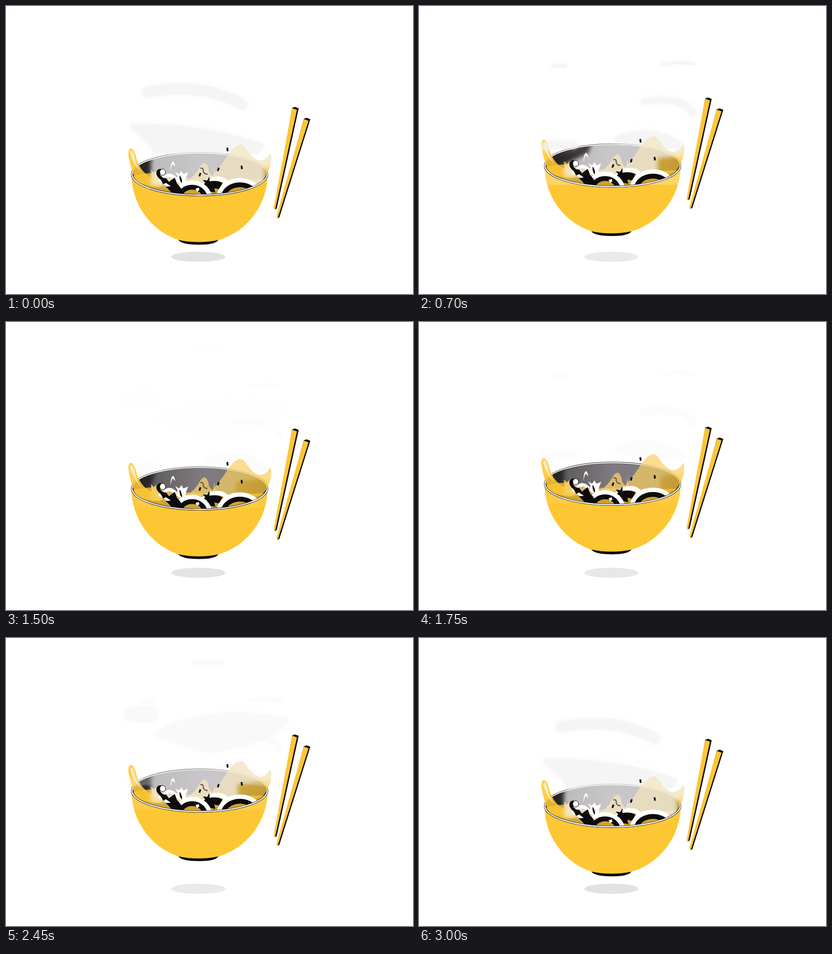
Animation, 842 px wide and 596 px high, one loop 3050 ms. Source, as an HTML page:

```html
<!DOCTYPE html>
<html lang="en">
<head>
<meta charset="utf-8">
<title>Noodle bowl</title>
<style>
  html, body { margin: 0; width: 100%; height: 100%; overflow: hidden; background: #fff; }
  svg { display: block; width: 100vw; height: 100vh; }
  .y { fill: #fdc633; }
  .k { fill: #0d0b0c; }
  .w { fill: #fff; }
  .line { fill: none; }
</style>
</head>
<body>
<svg viewBox="0 0 842 596">
  <defs>
    <linearGradient id="wall">
      <stop offset="0" stop-color="#1f1b1c"/>
      <stop offset=".2" stop-color="#343031"/>
      <stop offset=".5" stop-color="#58525a"/>
      <stop offset=".8" stop-color="#58525a"/>
      <stop offset="1" stop-color="#3a3637"/>
    </linearGradient>
    <filter id="soft" filterUnits="userSpaceOnUse" x="200" y="60" width="440" height="300"><feGaussianBlur stdDeviation="1.5"/></filter>
    <filter id="halo" filterUnits="userSpaceOnUse" x="200" y="60" width="440" height="300"><feGaussianBlur stdDeviation="9"/></filter>
    <filter id="edge" filterUnits="userSpaceOnUse" x="200" y="200" width="420" height="260"><feGaussianBlur stdDeviation="4"/></filter>
    <ellipse id="rim" cx="400.5" cy="348" rx="140" ry="43.5"/>
    <path id="peak" d="M428 350Q444 331 454 316Q472 287 485 287Q492 287 499 299Q513 319 525 320Q538 320 547 304Q551 314 547 329Q544 343 534 356Q515 376 428 365Z"/>
    <path id="body" d="M259.5 348A141 144 0 0 0 356 484Q398 493 441 484A141 144 0 0 0 541.5 348Z"/>
    <clipPath id="inside"><use href="#rim"/></clipPath>
    <clipPath id="open"><path d="M200 200H620V348H540.5A140 43.5 0 0 1 260.5 348H200Z"/></clipPath>
    <clipPath id="misty"><use href="#rim"/><use href="#peak"/></clipPath>
    <clipPath id="shell"><use href="#body"/></clipPath>
  </defs>

  <ellipse id="shadow" cx="398" cy="519" rx="56" ry="10.5"/>

  <g class="bob">
    <path class="k" d="M355 481Q358 494 400 494Q438 494 441 481Z"/>
    <use href="#body" class="y"/>
    <rect id="band" x="250" y="352" width="300" height="36" fill="#f7f3ea" clip-path="url(#shell)"/>
    <use href="#rim" fill="url(#wall)"/>
    <path fill="#d0a22b" d="M262 352Q300 340 330 352Q400 362 540 358V400H262Z" clip-path="url(#inside)"/>
    <g class="line">
      <use href="#rim" stroke="#2a2627" stroke-width="3.6"/>
      <use href="#rim" stroke="#fff" stroke-width="2"/>
    </g>
    <use href="#peak" class="y" opacity=".7" clip-path="url(#open)"/>
    <path class="y" opacity=".75" d="M376 361Q389 352 397 340Q405 325 411 325Q418 327 420 343Q424 351 431 353V363H376Z"/>
    <path class="y" opacity=".8" d="M431 334L433 353H429Z"/>
    <path class="y" opacity=".88" d="M253 307Q253 295 259 295Q266 297 270 316Q276 337 291 349L301 355L300 339L306 345L314 338L315 349L326 352L319 359L330 366L318 374Q290 374 270 363Q259 344 253 307Z"/>
    <path fill="#fdeab8" d="M257 305Q258 298 261 300Q266 306 268 322Q272 335 281 345Q263 329 257 305Z"/>
  </g>

  <g id="steam" fill="#f2f2f2">
    <g class="bob"><g clip-path="url(#misty)"><path id="mist" filter="url(#edge)"/></g></g>
  </g>

  <g class="bob">
    <g clip-path="url(#open)">
      <path class="line" stroke="#fff" stroke-width="9" d="M400 380Q420 353 445 358Q455 361 458 371"/>
      <path class="k" d="M406 372L412 366L407 360L416 361L421 353V363Q436 360 448 366L441 379L431 377L433 386L418 383L415 372Z"/>
      <g id="noodles"></g>
      <path class="line" stroke="#fff" stroke-width="7" d="M316 360Q336 366 347 389M327 355Q340 344 351 358"/>
      <path class="k" d="M311 349L316 347Q322 358 331 356L337 364L349 355L354 368Q363 376 367 389H344Q337 379 330 374L341 373L331 366L325 369L321 361Z"/>
      <path class="w" d="M350 343L358 348L363 341L367 348L377 344L371 359L375 365L363 370L352 362L355 352Z"/>
      <path class="k" d="M359 350Q365 357 364 367Q358 361 359 350Z"/>
      <path class="w" d="M392 378L399 376L400 381L395 384ZM421 352L427 356L423 359Z"/>
    </g>
    <path class="k" d="M311 344Q312 337 321 337L319 350L326 357L318 358Q311 352 311 344Z"/>
    <ellipse class="w" cx="324" cy="344" rx="6" ry="6.5" stroke="#0d0b0c"/>
    <path class="w" d="M340 341Q341 322 346 322Q349 324 350 333Q346 327 344 328Q342 333 340 341Z"/>
    <path class="line" stroke="#68635c" stroke-width="2.5" d="M402 336Q409 334 408 342Q410 348 417 348"/>
    <g id="bits" class="k"></g>
    <g class="line">
      <path stroke="#2a2627" stroke-width="4" d="M260.5 348A140 43.5 0 0 0 540.5 348"/>
      <path stroke="#fff" stroke-width="2.3" d="M260.5 348A140 43.5 0 0 0 540.5 348"/>
    </g>
  </g>

  <g id="sticks"></g>
</svg>
<script>
const LOOP = 3050, STEP = 50, CYCLE = LOOP / 3;
const $ = id => document.getElementById(id);
const clamp = v => Math.min(1, Math.max(0, v));
const ease = u => (1 - Math.cos(Math.PI * clamp(u))) / 2;
const shift = (el, y) => el.setAttribute('transform', `translate(0 ${y.toFixed(2)})`);

// turning points of each float: [time, height]
const bowlTurns = [[150, 0], [900, -21.5], [1400, -2.5], [2300, -35.5], [3075, 0]];
const stickTurns = [[0, 0], [625, -20], [1500, 11.5], [2400, -9.5], [3050, 0]];

function float(turns, t) {
  let y = turns[0][1];
  for (let i = 1; i < turns.length; i++) {
    const [t0, y0] = turns[i - 1], [t1, y1] = turns[i];
    y += (y1 - y0) * ease((t - t0) / (t1 - t0));
  }
  return y;
}

// steam poses: phase of full strength, then wisps as [path, thickness]
const poses = [
  { at: 0, wisps: [['M293 179Q400 156 488 203', 24], ['M263 250Q400 248 528 290L518 300H312Q300 278 263 250Z', 14]] },
  { at: 117, wisps: [['M262 134Q390 104 470 138Q502 162 430 163', 10], ['M254 222Q268 200 360 216Q545 215 541 246Q430 275 270 250Z', 20]] },
  { at: 183, wisps: [['M389 103H447', 11], ['M260 212H300', 32], ['M312 252Q420 195 578 225Q540 270 420 285Z', 14]] },
  { at: 707, wisps: [['M278 123H302', 9], ['M502 121Q535 113 568 119', 7], ['M465 197Q545 185 566 220', 15], ['M260 290Q290 284 320 287', 18], ['M412 276Q480 246 542 290Z', 16]] }
];

for (const p of poses) {
  const shapes = p.wisps.map(([d, w]) =>
    `<path d="${d}" stroke-width="${w}" fill="${d.endsWith('Z') ? '#f2f2f2' : 'none'}"/>`).join('');
  p.el = document.createElementNS('http://www.w3.org/2000/svg', 'g');
  p.el.innerHTML = `<g stroke="#f2f2f2" stroke-linecap="round" stroke-linejoin="round">
    <g filter="url(#halo)" opacity=".45">${shapes}</g><g filter="url(#soft)">${shapes}</g></g>`;
  $('steam').prepend(p.el);
}

const noodle = (x, y, rx, ry) => `<g stroke-width="10">
  <ellipse cx="${x}" cy="${y}" rx="${rx}" ry="${ry}" fill="#d0a22b" stroke="#fff"/>
  <ellipse cx="${x}" cy="${y}" rx="${rx - 9}" ry="${ry - 9}" fill="none" stroke="#0d0b0c"/></g>`;
$('noodles').innerHTML = noodle(385, 399, 36, 33) + noodle(484, 396, 43, 35);

$('bits').innerHTML = [[458, 297], [487.5, 334], [439, 338], [401, 349]].map(([x, y], i) =>
  `<path transform="translate(${x} ${y}) rotate(${i < 2 ? -8 : 18})" d="M-1.7-3.5L2-3.8L2 3.3L-1.5 3.8Z"/>`).join('');

// x, y: left corner of the cap; dx, dy: from there to the tip
const stick = (x, y, dx, dy) => `<g transform="translate(${x} ${y})">
  <path class="k" d="M0 0L6-2L13.5 1L${dx + 6.5} ${dy + 1}L${dx + 2} ${dy + 2.5}Z"/>
  <path class="y" d="M0 .5L10 3.5L${dx + 3.5} ${dy + 1.5}L${dx} ${dy}Z"/>
  <path class="k" d="M0 0L6-2L13.5 1L10 4Z"/></g>`;
$('sticks').innerHTML = stick(592, 211, -38.5, 207.5) + stick(616, 233.5, -57, 203);

const bobs = [...document.querySelectorAll('.bob')];
const ahead = (a, b) => ((b - a) % CYCLE + CYCLE) % CYCLE;

// strength of a pose, and the time from its full strength
function presence(i, phase) {
  const n = poses.length, at = poses[i].at;
  const since = ahead(at, phase), until = ahead(phase, at);
  const fade = 1 - since / ahead(at, poses[(i + 1) % n].at);
  const grow = 1 - until / ahead(poses[(i + n - 1) % n].at, at);
  return [ease(Math.max(fade, grow)), fade > 0 ? since : -until];
}

function draw(t) {
  const y = float(bowlTurns, t), phase = t % CYCLE, cycle = Math.floor(t / CYCLE);
  bobs.forEach(el => shift(el, y));
  shift($('sticks'), float(stickTurns, t));

  const g = Math.round(226 + 8 * clamp(-y / 18));
  $('shadow').setAttribute('fill', `rgb(${g},${g},${g})`);

  // the middle cycle is thin
  const density = .25 + .48 * clamp((Math.abs(t - LOOP / 2) - 430) / 150);
  $('steam').setAttribute('opacity', density);

  const rise = 14 * cycle * Math.sin(Math.PI * phase / CYCLE) ** 2;
  poses.forEach((p, i) => {
    const [w, d] = presence(i, phase);
    p.el.setAttribute('opacity', w);
    shift(p.el, -rise - .12 * d);
    if (i === 3) $('band').setAttribute('opacity', .4 * density * w);
  });

  // clear patches at both sides of the bowl
  const left = 320 + 85 * Math.exp(-(((t - 950) / 350) ** 2));
  const right = 505 + 30 * Math.cos(2 * Math.PI * phase / CYCLE);
  $('mist').setAttribute('d', `M${left} 250H570V325L${right} 333V372H300V347L${left - 20} 322Z`);
}

function tick(now) {
  draw(Math.floor(now % LOOP / STEP) * STEP);
  requestAnimationFrame(tick);
}
draw(0);
requestAnimationFrame(tick);
</script>
</body>
</html>
```
